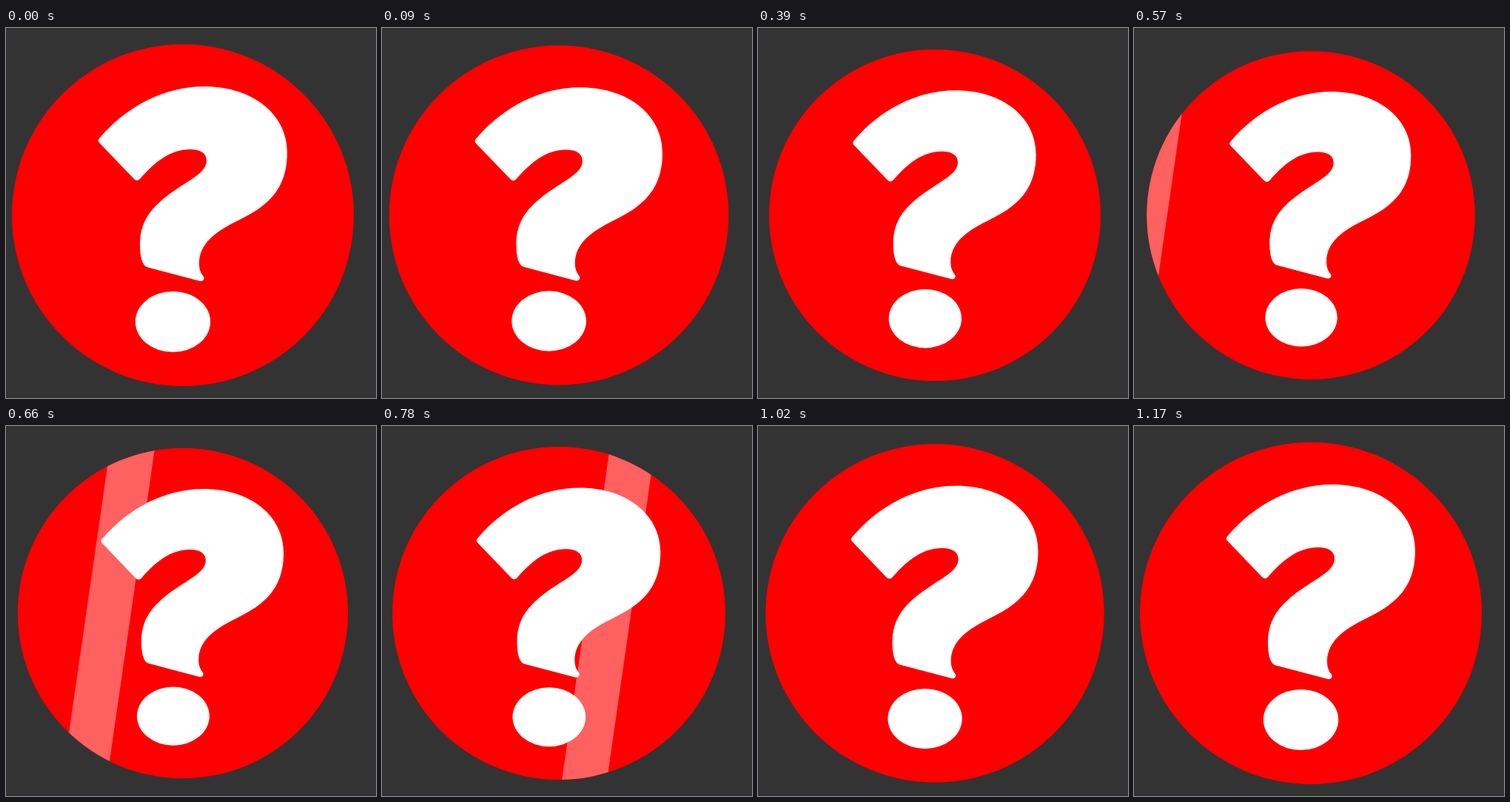
Animation, 500 px wide and 500 px high, one loop 1200 ms. Source, as an HTML page:

```html
<!DOCTYPE html>
<html lang="en">
<head>
<meta charset="utf-8">
<title>Question badge</title>
<style>
  html, body { margin: 0; width: 100%; height: 100%; overflow: hidden; background: #333; }
  svg { display: block; width: 100vw; height: 100vh; }
</style>
</head>
<body>
<svg viewBox="0 0 500 500">
  <defs>
    <clipPath id="disc"><circle cx="239" cy="253" r="231"/></clipPath>
  </defs>
  <rect width="500" height="500" fill="#333"/>
  <g id="badge">
    <circle cx="239" cy="253" r="231" fill="#f00"/>
    <g clip-path="url(#disc)"><polygon id="shine" fill="#ff6060"/></g>
    <g fill="#fff">
      <path d="M127 148C163 106 214 79 268 79C334 79 380 117 380 168
        C380 207 364 229 339 246C328 253 317 258.500 306 264C283 276 261 292 261 318
        C261 326 263 331 267 336C269 339 266 343 262 342L190 323
        C184 320 181 309 181 293C181 258 199 238 236 214
        C258 200 271 192 271 179C271 169 262 164 249 164
        C222 164 201 181 181 204Q177 208 173 204L126 155Q123 152 127 148Z"/>
      <ellipse cx="225.500" cy="397" rx="50.700" ry="41"/>
    </g>
  </g>
</svg>
<script>
  const LOOP = 1200, STEP = 30;
  const CX = 239, CY = 253;
  const LOW = 540, HIGH = 1170;   // times of smallest and full size
  const DIP = 0.042;
  const LEAN = 0.1445, BAND = 62.6, SPEED = 1.44;
  const badge = document.getElementById('badge');
  const shine = document.getElementById('shine');

  function draw(now) {
    const t = Math.floor((now % LOOP) / STEP) * STEP;

    const dip = t < LOW ? t / LOW : (HIGH - t) / (HIGH - LOW);
    const s = 1 - DIP * dip;
    badge.setAttribute('transform',
      `translate(${CX} ${CY}) scale(${s}) translate(${-CX} ${-CY})`);

    // slanted band sweeping across at constant speed
    const x = CX - 135.2 + SPEED * (t - 660);
    const h = 260, d = h * LEAN;
    shine.setAttribute('points', [
      [x + d, CY - h], [x + BAND + d, CY - h],
      [x + BAND - d, CY + h], [x - d, CY + h]
    ].join(' '));
  }

  const start = performance.now();
  function tick() {
    draw(performance.now() - start);
    requestAnimationFrame(tick);
  }
  draw(0);
  requestAnimationFrame(tick);
</script>
</body>
</html>
```
